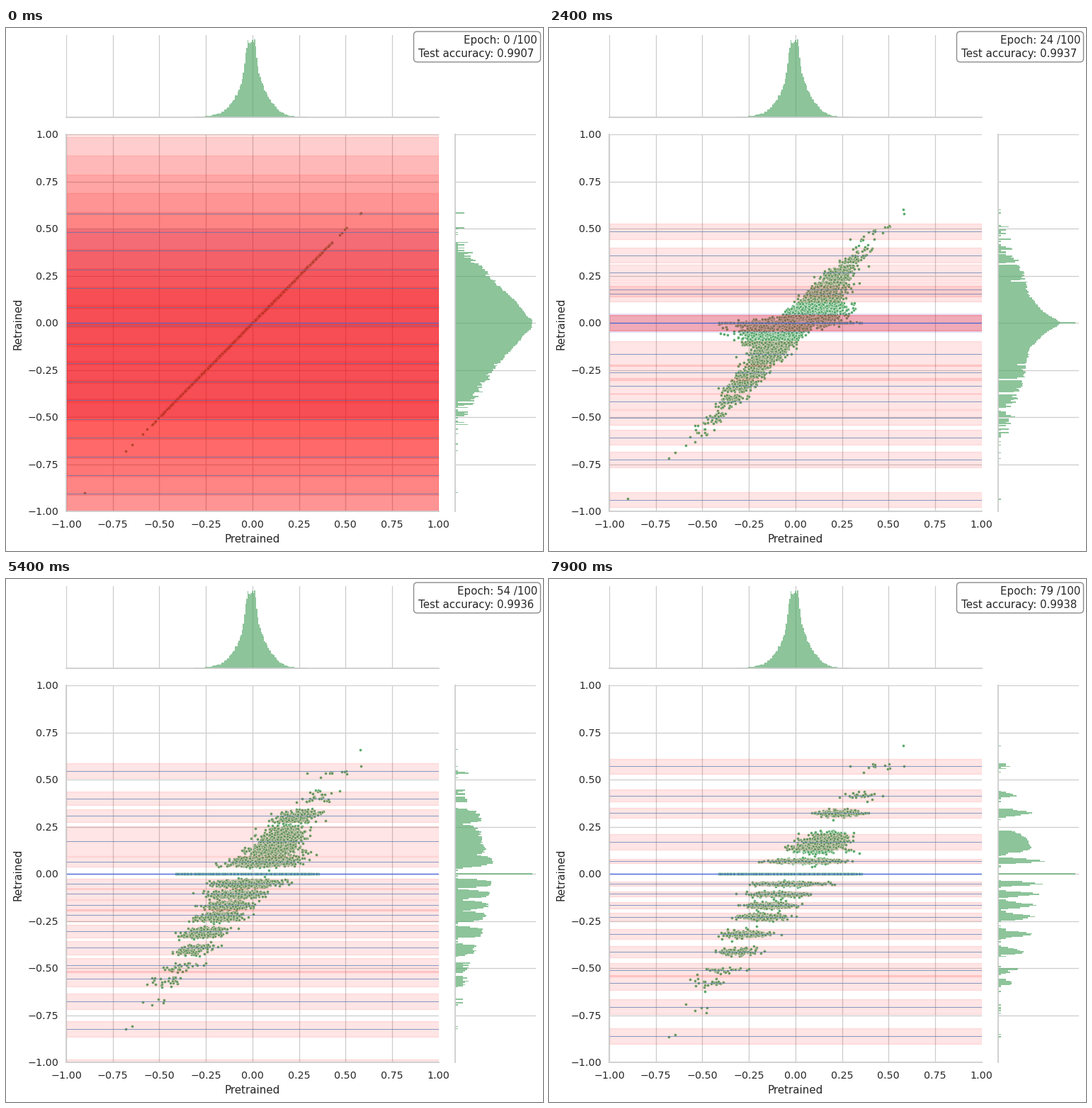
Animation of 758 by 738 pixels, one loop 8 s. Source, as a matplotlib script:

```python
import numpy as np
import matplotlib.pyplot as plt
from matplotlib.animation import FuncAnimation
from matplotlib.patches import FancyBboxPatch

W, H, DPI = 758, 738, 100
EPOCHS = 80
BIN = 0.006
GREEN, GREY, INK = "#55a868", "0.8", "0.15"
rng = np.random.default_rng(7)
plt.rcParams["font.family"] = "DejaVu Sans"

# Component means: evenly spaced, then settled with three at zero, then spread out
i = np.arange(7)
START = np.linspace(-0.907, 0.58, 16)
SETTLED = np.concatenate([
    [-0.907], -(0.19 + 0.052 * i + 0.0053 * i**2)[::-1], np.zeros(3),
    (0.16 + 0.0175 * i + 0.0147 * i**2)[:5]])
FINAL = np.array([-1.06, -0.86, -0.705, -0.578, -0.51, -0.413, -0.32, -0.228,
                  -0.167, -0.107, -0.053, 0.068, 0.168, 0.323, 0.415, 0.57])
WIDE = 12  # the component that stays broad

# Single far-out weights and where they end
FAR_X = np.array([-0.902, -0.68, -0.645, 0.497, 0.58, 0.583])
FAR_END = np.array([-1.06, -0.865, -0.853, 0.555, 0.68, 0.57])


def drift(e):
    return np.interp(e, [15, 35, 45, 79], [0, 0.45, 0.7, 1])


def bump(e):
    return np.interp(e, [15, 35, 45], [0, 1, 0])


def means(e):
    if e < 15:
        return START + (1 - (1 - e / 15) ** 2) * (SETTLED - START)
    m = SETTLED + drift(e) * (FINAL - SETTLED)
    drop = np.interp(e, [27, 35], [0, -0.08])
    m[8:11] = drop + np.interp(e, [35, 45], [0, 1]) * (FINAL[8:11] - drop)
    m[11] = np.interp(e, [15, 24, 35, 45, 79], [0.16, 0.153, 0.083, 0.062, 0.068])
    m[7] += 0.075 * bump(e)
    m[WIDE] -= 0.02 * bump(e)
    return m


def halves(e):
    tight = np.minimum(0.041, 0.008 + 0.055 * np.abs(FINAL))
    h = 0.041 + np.interp(e, [45, 64], [0, 1]) * (tight - 0.041)
    h[7] += 0.055 * bump(e)
    h[WIDE] = np.interp(e, [24, 45, 64, 79], [0.041, 0.09, 0.066, 0.042])
    return h + 0.463 * np.exp(-e / 1.8)


def zero_half(e):
    return np.interp(e, [15, 24, 35, 45, 79], [0.085, 0.05, 0.03, 0.006, 0.004]) + 0.41 * np.exp(-e / 2.5)


def sample(knots, scale):
    """Draw values whose log-histogram follows the given polyline."""
    x, w = np.array(knots).T
    grid = np.arange(-0.75, 0.75, BIN)
    level = np.interp(grid, x, w, left=-99, right=-99)
    out = np.repeat(grid, rng.poisson(np.exp((level - 4) / scale)))
    return rng.permutation(out + rng.uniform(-BIN / 2, BIN / 2, out.size))


# Weights that end up pruned to zero
zx = sample([(-0.42, 0), (-0.35, 12), (-0.25, 42), (-0.2, 60), (-0.124, 83),
             (-0.055, 99.5), (-0.036, 107), (-0.025, 109.3), (0.015, 109.3),
             (0.033, 102.5), (0.055, 98), (0.124, 82), (0.17, 66),
             (0.25, 30), (0.3, 15), (0.36, 0)], 13.2)
z_mid = zx * rng.uniform(0, 1.15, zx.size) / (1 + (zx / 0.28) ** 4)
z_mid += 0.018 * rng.normal(size=zx.size)
z_rank = rng.random(zx.size)
z_show = (np.arange(zx.size) < 2500) | (np.abs(zx) > 0.115)

# Weights that survive; goal is where they sit before clustering
goal = sample([(-0.7, 0), (-0.62, 5), (-0.5, 12), (-0.42, 21), (-0.33, 30),
               (-0.2, 38), (-0.03, 45), (-0.015, 20), (0, -20), (0.015, 25),
               (0.05, 48), (0.15, 41), (0.25, 32), (0.33, 25), (0.38, 14),
               (0.45, 0), (0.49, 4), (0.54, 4)], 9.3)
spread = 0.055 + 0.035 * np.exp(-np.abs(goal) / 0.08)
sx = 0.8 * goal + spread * rng.normal(size=goal.size)
cuts = (FINAL[1:] + FINAL[:-1]) / 2
group = np.searchsorted(cuts, goal)
cell = np.concatenate([[cuts[0] - 0.2], cuts, [cuts[-1] + 0.13]])
lo, hi = cell[group], cell[group + 1]
offset = np.where(group == WIDE,
                  (2 * goal - lo - hi) / (hi - lo) + 0.25 * rng.normal(size=goal.size),
                  rng.laplace(scale=0.24, size=goal.size))


def pruned(e):
    r = min(e / 15, 1)
    c = np.interp(e, [15, 24, 35, 45], [1, 0.7, 0.25, 0.01])
    y = (zx + r * (z_mid - zx)) * c
    y[z_rank < np.interp(e, [0, 24, 45], [0, 0.45, 1])] = 0
    return y


def kept(e, mean, half):
    y = sx + np.interp(e, [0, 15, 35, 45], [0, 0.45, 0.85, 1]) * (goal - sx)
    pull = np.interp(e, [0, 15, 45], [0, 0.2, 0])
    near = mean[np.abs(y[:, None] - mean).argmin(axis=1)]
    y = np.where(np.abs(y) > 0.22, y + pull * (near - y), y)
    b = np.interp(e, [45, 64], [0, 1])
    return (1 - b) * y + b * (mean[group] + half[group] * offset)


# Figure and axes
fig = plt.figure(figsize=(W / DPI, H / DPI), dpi=DPI, facecolor="white")


def panel(x, y, w, h, spines):
    ax = fig.add_axes([x / W, 1 - (y + h) / H, w / W, h / H])
    ax.set_axisbelow(True)
    ax.tick_params(length=0, labelleft=False, labelbottom=False)
    for name, spine in ax.spines.items():
        spine.set(visible=name in spines, color=GREY, linewidth=1.25)
    return ax


def label(x, y, s, px, **kw):
    return fig.text(x / W, 1 - y / H, s, fontsize=px * 72 / DPI, color=INK, **kw)


main = panel(85, 150, 525.6, 532, ("left", "bottom"))
top = panel(85, 10, 525.6, 116, ("bottom",))
side = panel(634, 150, 114, 532, ("left",))
ticks = np.linspace(-1, 1, 9)
main.set(xlim=(-1, 1), ylim=(-1, 1), xticks=ticks[:-1], yticks=ticks)
top.set(xlim=(-1, 1), ylim=(0, 116), xticks=ticks[:-1], yticks=[])
side.set(xlim=(0, 114), ylim=(-1, 1), xticks=[], yticks=ticks[1:])
for ax in (main, top, side):
    ax.grid(True, color=GREY, linewidth=0.9)

for v in ticks:
    text = f"{v:.2f}".replace("-", "\u2212")
    label(74, 416 - 266 * v + 5.2, text, 14.3, ha="right")
    label(347.8 + 262.8 * v, 705.3, text, 14.3, ha="center")
label(347.5, 726.3, "Pretrained", 15.1, ha="center")
label(17, 417, "Retrained", 15.1, ha="center", va="center", rotation=90)

fig.add_artist(FancyBboxPatch(
    (575.5, H - 48), 179, 43, boxstyle="round,pad=0,rounding_size=5",
    transform=None, facecolor="white", edgecolor="0.55", linewidth=1))
epoch_text = label(750, 21.7, "", 15, ha="right")
acc_text = label(745.5, 41, "", 15, ha="right")

# Marginal histograms
edges = (np.arange(-184, 126) - 0.5) * BIN
counts, _ = np.histogram(np.concatenate([zx, sx, FAR_X]), edges)
top.stairs(110 * counts / counts.max(), edges, fill=True, color=GREEN, alpha=0.67)
side_hist = side.stairs(np.zeros(counts.size), edges, orientation="horizontal",
                        fill=True, color=GREEN, alpha=0.67)

# Scatter, bands and mean lines
all_x = np.concatenate([zx[z_show], sx, FAR_X])
dots = main.scatter(all_x, all_x, s=8, color=GREEN, edgecolors="white",
                    linewidths=0.3, zorder=1.2)
zero_band = main.axhspan(-0.1, 0.1, color="blue", alpha=0.07, lw=1, zorder=1.4)
bands = [main.axhspan(0, 0.1, color="red", alpha=0.1, lw=1, zorder=1.5) for _ in range(16)]
lines = [main.axhline(0, color="#4c72b0", lw=0.6, alpha=0.8, zorder=1.6) for _ in range(16)]
main.axhline(0, color="royalblue", lw=0.9, alpha=0.8, zorder=1.6)

accuracy = np.interp(np.arange(EPOCHS), [0, 15, 24, 35, 45, 64, 79],
                     [0.9907, 0.9936, 0.9937, 0.9932, 0.9936, 0.9936, 0.9938])


def set_band(band, mid, half):
    band.set_y(mid - half)
    band.set_height(2 * half)


def draw(e):
    mean, half = means(e), halves(e)
    for band, line, m, h in zip(bands, lines, mean, half):
        set_band(band, m, h)
        line.set_ydata([m, m])
    set_band(zero_band, 0, zero_half(e))

    zy, sy = pruned(e), kept(e, mean, half)
    fy = FAR_X + drift(e) * (FAR_END - FAR_X)
    dots.set_offsets(np.column_stack([all_x, np.concatenate([zy[z_show], sy, fy])]))

    n, _ = np.histogram(np.concatenate([zy, sy, fy]), edges)
    bars = 4 + 105 * np.log(np.maximum(n, 1)) / np.log(n.max())
    side_hist.set_data(np.where(n > 0, bars, 0))

    epoch_text.set_text(f"Epoch: {e} /100")
    acc_text.set_text(f"Test accuracy: {accuracy[e]:.4f}")
    return []


anim = FuncAnimation(fig, draw, frames=EPOCHS, interval=100, repeat=True)
plt.show()
```
